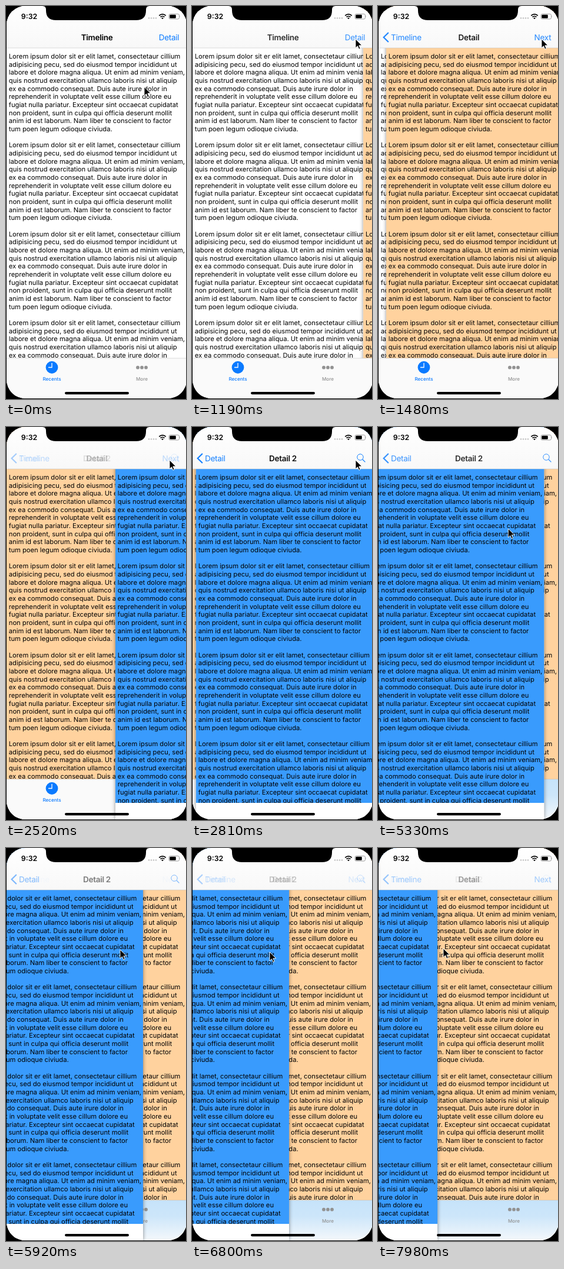
An HTML page that plays this animation: 306 px wide and 665 px high, repeating every 8 s.

```html
<!DOCTYPE html>
<html lang="en">
<head>
<meta charset="utf-8">
<title>Navigation swipe</title>
<style>
  html, body { margin: 0; width: 100%; height: 100%; overflow: hidden; background: #000; }
  svg { display: block; width: 306px; height: 665px; text-rendering: geometricPrecision;
        font-family: Inter, Roboto, "Liberation Sans", sans-serif; }
  .body { font-size: 11.19px; }
  .sheet { filter: drop-shadow(0 0 3px rgba(0, 0, 0, .45)); }
  .item { font-size: 13.5px; letter-spacing: -.02em; fill: #0a7aff; }
  .item .title { font-weight: 600; fill: #000; text-anchor: middle; }
  .line { fill: none; stroke: #0a7aff; }
  .label { font-size: 8.1px; font-weight: 500; text-anchor: middle; }
  .clock { font-size: 12.3px; font-weight: 600; text-anchor: middle; }
</style>
</head>
<body>
<svg viewBox="0 0 306 665">
  <defs>
    <linearGradient id="navFill" x2="0" y2="1">
      <stop stop-color="#fff"/><stop offset="1" stop-color="#f8f8f8"/>
    </linearGradient>
    <linearGradient id="tabTint" x2="0" y2="1">
      <stop stop-color="#c6e3fa"/><stop offset=".4" stop-color="#cde6fa"/>
      <stop offset="1" stop-color="#f4f8fb"/>
    </linearGradient>
    <clipPath id="screen"><rect x="1" width="306" height="664" rx="32"/></clipPath>
  </defs>
  <g clip-path="url(#screen)">
    <g id="timeline"></g>
    <g id="detail"></g>
    <g id="tabs">
      <rect id="tabFill" x="1" y="596" width="306" height="68" fill="#fafafa"/>
      <path d="M1 596h306" stroke="#b8b8b8" stroke-width=".5"/>
      <circle cx="78" cy="611.5" r="10.4" fill="#0a7aff"/>
      <path d="M78 604v7.5h-6" fill="none" stroke="#fff" stroke-width="1.3"/>
      <text class="label" x="78" y="633.5" fill="#0a7aff">Recents</text>
      <g fill="#929292">
        <circle cx="224" cy="611.7" r="2.9"/><circle cx="231" cy="611.7" r="2.9"/><circle cx="238" cy="611.7" r="2.9"/>
        <text class="label" x="231" y="633.5">More</text>
      </g>
    </g>
    <g id="detail2"></g>
    <rect x="1" width="306" height="71" fill="url(#navFill)"/>
    <path d="M1 71h306" stroke="#b8b8b8" stroke-width=".5"/>
    <g id="items"></g>
    <text class="clock" x="39.5" y="22.4">9:32</text>
    <g fill="#c4c4c4">
      <circle cx="243" cy="20.5" r="1.3"/><circle cx="247" cy="20.5" r="1.3"/>
      <circle cx="251" cy="20.5" r="1.3"/><circle cx="255" cy="20.5" r="1.3"/>
    </g>
    <g fill="none" stroke="#000" stroke-width="1.7">
      <path d="M260.3 16.3a8 8 0 0 1 11.4 0M262.5 18.7a5 5 0 0 1 7 0"/>
      <path d="M266 22.3l-1.9-1.9a2.7 2.7 0 0 1 3.8 0z" fill="#000" stroke="none"/>
    </g>
    <rect x="277" y="13.5" width="17.5" height="8.6" rx="2.4" fill="none" stroke="#888" stroke-width=".8"/>
    <rect x="278.3" y="14.8" width="10.5" height="6" rx="1.2"/>
    <path d="M295.6 16.3q1.2 1.5 0 3z" fill="#888"/>
    <rect x="100" y="653" width="109" height="4.2" rx="2.1"/>
    <path d="M62 0q6 0 6 6v1.5q0 16.5 17 16.5h136q17 0 17-16.5v-1.5q0-6 6-6z"/>
  </g>
  <path id="cursor" d="M0 0v15l3.5-3.3 2.4 5.3 2.3-1-2.3-5.2h5z" stroke="#fff" stroke-width=".9"/>
</svg>
<script>
const LOOP = 8000, FIRST = 442, STEP = 147.5, WIDTH = 306;
const LOREM = `Lorem ipsum dolor sit er elit lamet, consectetaur cillium
adipisicing pecu, sed do eiusmod tempor incididunt ut
labore et dolore magna aliqua. Ut enim ad minim veniam,
quis nostrud exercitation ullamco laboris nisi ut aliquip
ex ea commodo consequat. Duis aute irure dolor in
reprehenderit in voluptate velit esse cillum dolore eu
fugiat nulla pariatur. Excepteur sint occaecat cupidatat
non proident, sunt in culpa qui officia deserunt mollit
anim id est laborum. Nam liber te conscient to factor
tum poen legum odioque civiuda.`.split("\n");

const $ = id => document.getElementById(id);

function fillPage(id, color, bottom) {
  let text = "";
  for (let para = 0; para < 4; para++)
    LOREM.forEach((line, i) => {
      const y = 89 + (para * 11 + i) * 13.67;
      if (y < bottom + 9) text += `<text x="4.8" y="${y.toFixed(2)}">${line}</text>`;
    });
  $(id).innerHTML = `
    <rect class="sheet" x="1" width="${WIDTH}" height="664" fill="#fff"/>
    <rect x="1" width="${WIDTH}" height="${bottom}" fill="${color}"/>
    <g class="body">${text}</g>
    <rect x="1" y="${bottom}" width="${WIDTH}" height="${664 - bottom}" fill="#fff"/>`;
}
fillPage("timeline", "#fff", 596);
fillPage("detail", "#ffd29e", 596);
fillPage("detail2", "#399bfd", 636);

const back = name => `<path class="line" stroke-width="2.2" d="M17.8 45l-8.2 8 8.2 8"/><text x="22" y="57.9">${name}</text>`;
const title = name => `<text class="title" x="154.5" y="57.9">${name}</text>`;
const action = name => `<text x="294.3" y="57.9" text-anchor="end">${name}</text>`;
const search = `<circle class="line" cx="286" cy="51" r="5.2"/><path class="line" stroke-width="1.3" d="M289.8 54.8l4.6 4.6"/>`;
$("items").innerHTML = [
  title("Timeline") + action("Detail"),
  back("Timeline") + title("Detail") + action("Next"),
  back("Detail") + title("Detail 2") + search
].map(item => `<g class="item">${item}</g>`).join("");
const items = $("items").children;

// Keys are [time, ...values], joined by straight segments.
function at(keys, t) {
  const i = keys.findIndex(k => k[0] > t);
  if (i === 0) return keys[0].slice(1);
  if (i < 0) return keys[keys.length - 1].slice(1);
  const a = keys[i - 1], b = keys[i], p = (t - a[0]) / (b[0] - a[0]);
  return a.slice(1).map((v, j) => v + (b[j + 1] - v) * p);
}

const CURSOR = [
  [295, 235, 137], [884, 278, 56], [2802, 278, 56], [3539, 297, 171],
  [3686, 310, 174], [3982, 310, 174], [4129, 293, 176], [5014, 235, 172],
  [5899, 194, 172], [6194, 178, 173], [6342, 178, 173], [6784, 132, 176],
  [7227, 120, 173], [7374, 120, 173], [7964, 111, 170]
];
const DRAG = [
  [5014, 0], [5899, 74], [6194, 95], [6342, 95],
  [6784, 142], [7227, 180], [7374, 180], [7964, 206]
];

// Critically damped spring: 0 before the start, then settling at 1.
function push(t, start) {
  const x = 15.3 * Math.max(0, t - start) / 1000;
  return 1 - (1 + x) * Math.exp(-x);
}

const fade = p => p ** 2.5;
const move = (id, x, y = 0) => $(id).setAttribute("transform", `translate(${x.toFixed(2)} ${y.toFixed(2)})`);

function render(time) {
  const t = FIRST + Math.floor((time - FIRST) / STEP) * STEP;
  const p1 = push(t, 1150), p2 = push(t, 2415), drag = at(DRAG, t)[0];
  const top = p2 * (1 - drag / WIDTH);

  move("detail", (1 - p1) * (WIDTH + 8));
  move("detail2", (1 - p2) * (WIDTH + 8) - drag);
  $("tabFill").setAttribute("fill", t > 4000 ? "url(#tabTint)" : "#fafafa");

  items[0].style.opacity = fade(1 - p1);
  items[1].style.opacity = fade(p1 * (1 - top));
  items[2].style.opacity = fade(top);

  move("cursor", ...at(CURSOR, t));
}

function frame() {
  render(performance.now() % LOOP);
  requestAnimationFrame(frame);
}
frame();
</script>
</body>
</html>
```
